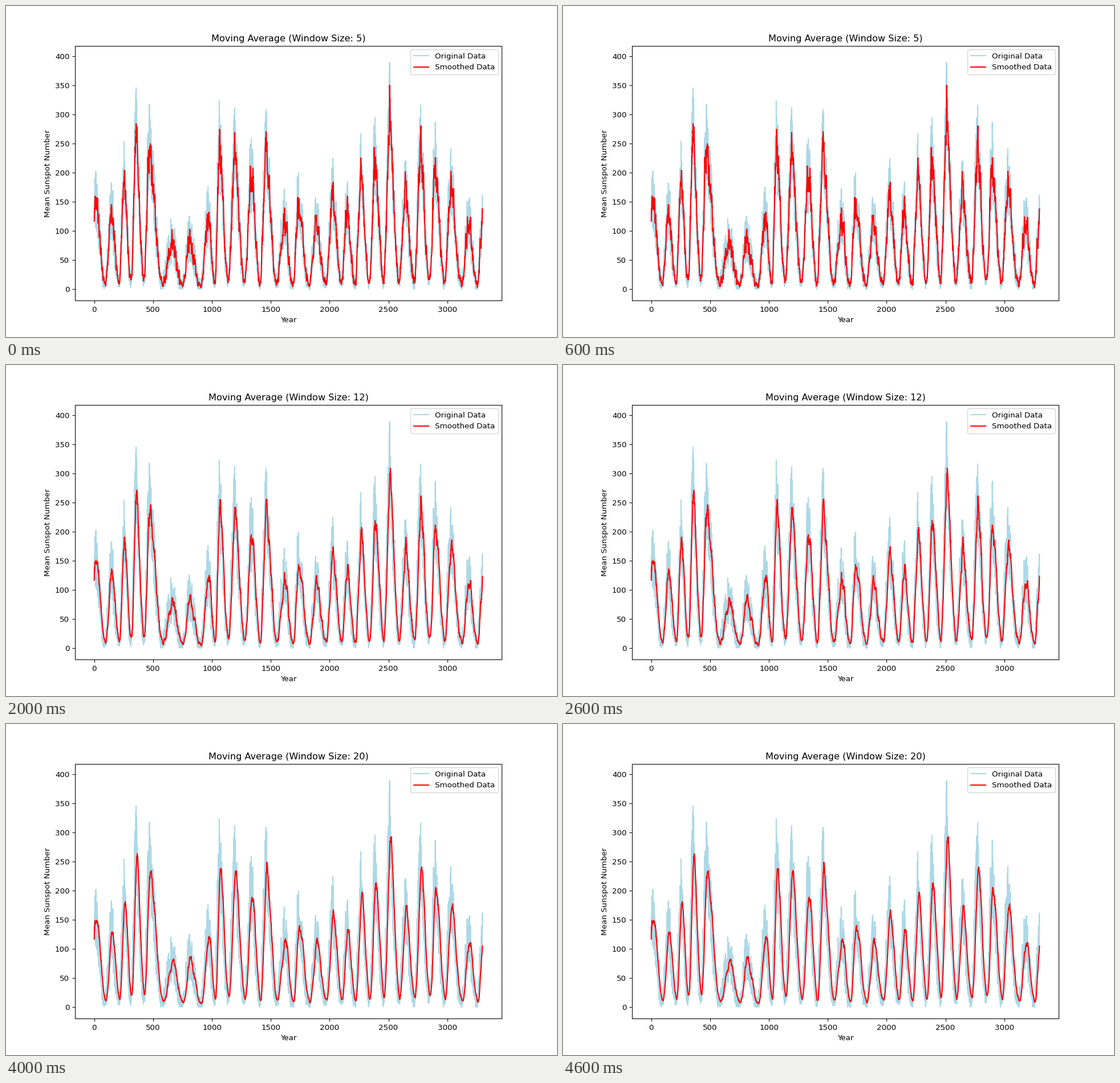
Recreate the animation shown at these times as a matplotlib script. Size 966 by 580 pixels, loop 5000 ms.

```python
import numpy as np
import matplotlib.pyplot as plt
from matplotlib.animation import FuncAnimation

plt.rcParams["font.family"] = "DejaVu Sans"

MONTHS = 3300
WINDOWS = [5, 10, 12, 15, 20]

# Top of each activity cycle: month, level
PEAKS = [
    (-90, 110), (13, 144), (147, 128), (253, 181), (355, 246), (468, 226),
    (660, 79), (810, 79), (970, 117), (1062, 230), (1193, 222), (1334, 184),
    (1460, 220), (1615, 113), (1736, 142), (1887, 104), (2027, 160),
    (2148, 125), (2265, 190), (2386, 210), (2510, 277), (2643, 154),
    (2774, 225), (2898, 204), (3030, 172), (3181, 107), (3305, 125),
]
TROUGH_AT = 0.58      # share of the gap between two peaks
TROUGH_LEVEL = 0.06   # share of the mean of both peaks
SPIKE = 1.35          # strongest month of a cycle against its level


def ease(u):
    return (1 - np.cos(np.pi * u)) / 2


def make_cycles(month):
    """Slow fall to a trough, then a quick rise to the next peak."""
    base = np.zeros(len(month))
    for (p, high), (q, top) in zip(PEAKS, PEAKS[1:]):
        mid = p + TROUGH_AT * (q - p)
        low = TROUGH_LEVEL * (high + top) / 2
        fall = (month >= p) & (month < mid)
        rise = (month >= mid) & (month < q)
        u = (month[fall] - p) / (mid - p)
        base[fall] = high + (low - high) * ease(u ** 0.85)
        u = (month[rise] - mid) / (q - mid)
        base[rise] = low + (top - low) * ease(u)
    return 1.04 * base


def make_series():
    month = np.arange(MONTHS)
    base = make_cycles(month)
    rng = np.random.default_rng(11)
    # Skewed noise: many small dips, few tall spikes
    noise = ((rng.gamma(4, size=MONTHS) - 4) / 2).clip(-2, 2)
    series = base + 2.5 * np.sqrt(base) * noise
    for p, _ in PEAKS:
        if 0 <= p < MONTHS:
            series[p] = SPIKE * base[p]
    return series.clip(0)


def moving_average(series, window):
    """Trailing mean; the first months use what is available."""
    total = np.concatenate([[0], np.cumsum(series)])
    end = np.arange(1, len(series) + 1)
    start = np.maximum(end - window, 0)
    return (total[end] - total[start]) / (end - start)


series = make_series()
smoothed = [moving_average(series, w) for w in WINDOWS]

fig, ax = plt.subplots(figsize=(10, 6), dpi=96.6)
fig.set_size_inches(966 / fig.dpi, 580 / fig.dpi)
ax.plot(series, color="lightblue", label="Original Data")
line, = ax.plot(smoothed[0], color="red", label="Smoothed Data")
ax.set_ylim(-19.9, 418.1)
ax.set_xlabel("Year")
ax.set_ylabel("Mean Sunspot Number")
ax.legend(loc="upper right")
title = ax.set_title("")


def update(i):
    line.set_ydata(smoothed[i])
    title.set_text(f"Moving Average (Window Size: {WINDOWS[i]})")
    return line, title


anim = FuncAnimation(fig, update, frames=len(WINDOWS), interval=1000,
                     repeat=True, repeat_delay=0)
plt.show()
```
